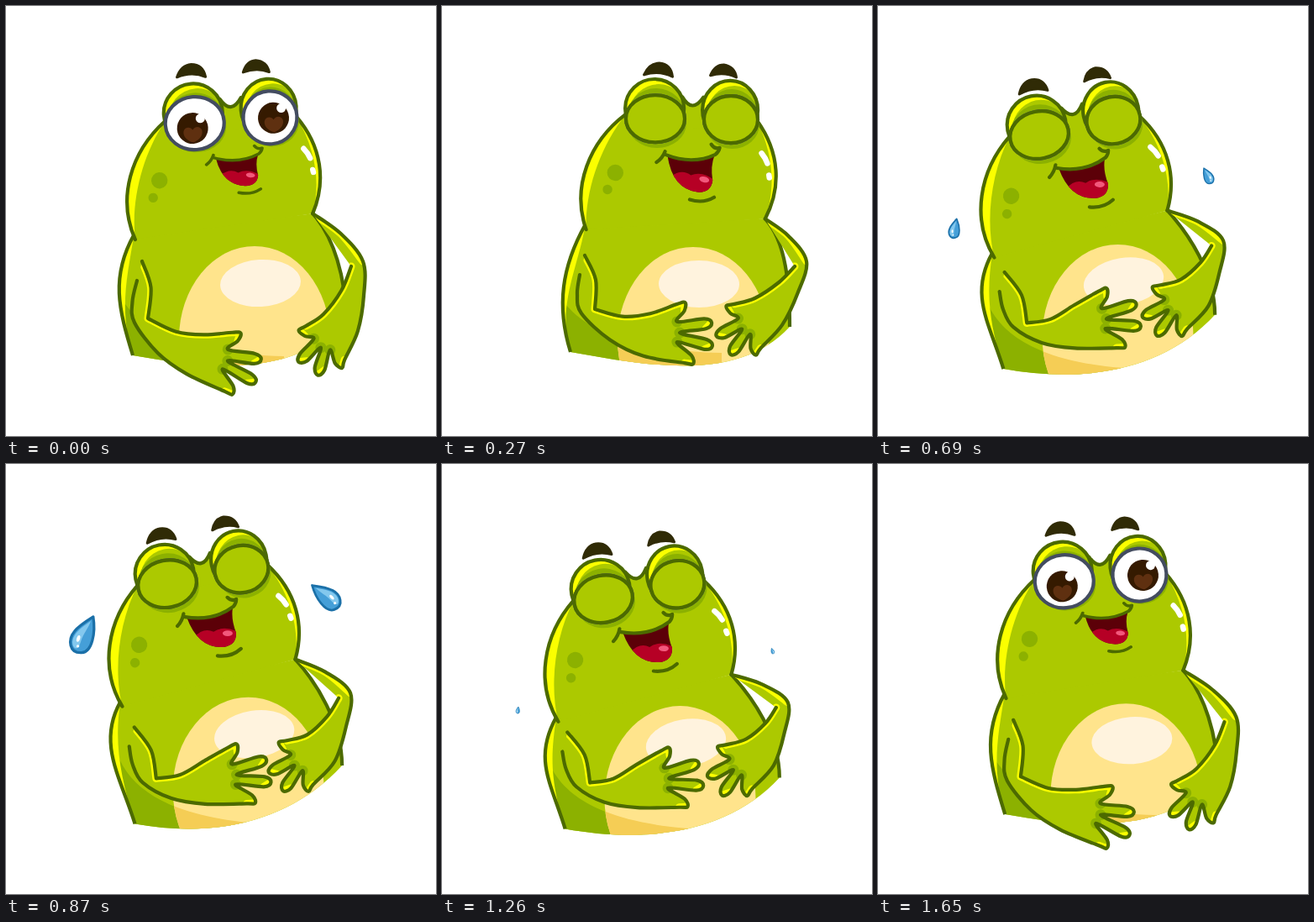
Recreate the animation shown at these times as an HTML page. Size 512 by 512 pixels, loop 1680 ms.

```html
<!DOCTYPE html>
<html lang="en">
<head>
<meta charset="utf-8">
<title>Laughing frog</title>
<style>
  html, body { margin: 0; width: 100%; height: 100%; overflow: hidden; background: #fff; }
  svg { display: block; width: 100%; height: 100%; }
  .line { fill: none; stroke: #4c6a00; stroke-width: 4.2; stroke-linecap: round; stroke-linejoin: round; }
  .butt { stroke-linecap: butt; }
  .skin { fill: #acc900; }
  .dark { fill: #8cb100; }
  .glow { fill: #fbff00; }
  .edge { fill: none; stroke: #fbff00; stroke-width: 9; stroke-linecap: round; stroke-linejoin: round; }
  .gap { fill: none; stroke: #8cb100; stroke-width: 13; stroke-linecap: round; }
</style>
</head>
<body>
<svg id="stage" viewBox="0 0 512 512" xmlns="http://www.w3.org/2000/svg"></svg>
<script>
const LOOP = 1680, STEP = 30, BEAT = 270;
const LOW = 485, SETTLE = 1320, TEARS = 465;
const RAD = Math.PI / 180;

// Joints as [x, y] or [x, y, angle]
const REST = {
  head: [269.5, 135, -4.3], base: [151, 416], hip: [405, 375], belly: [296, 396],
  shoulder: [162, 304], pit: [169, 372], palmL: [240, 415, 0],
  elbow: [425, 304], palmR: [385, 390, 27]
};
const LEAN = {
  head: [299, 133.5, 0.6], base: [153, 412], hip: [414, 382], belly: [299, 397],
  shoulder: [170, 297], pit: [182, 361], palmL: [258, 388, -15],
  elbow: [434, 304], palmR: [372, 372, 9]
};
const BENT = {
  head: [236, 152.5, -11.2], base: [146, 435], hip: [402, 375], belly: [283, 399],
  shoulder: [149, 320], pit: [176, 380], palmL: [245, 378, -25],
  elbow: [412, 285], palmR: [362, 352, 9]
};
const HIGH = {
  head: [236, 131.5, -11.2], base: [154, 428], hip: [400, 358], belly: [289, 387],
  shoulder: [153, 313], pit: [179, 374], palmL: [250, 373, -25],
  elbow: [410, 272], palmR: [358, 346, 9]
};
// Finger angle from the thumb, and length
const FINGERS = [[0, 47], [38, 64], [63, 66], [91, 56]];

const clamp = v => Math.max(0, Math.min(1, v));
const smooth = v => { const u = clamp(v); return u * u * (3 - 2 * u); };
const mix = (a, b, k) => {
  const out = {};
  for (const key in a) out[key] = a[key].map((v, i) => v + (b[key][i] - v) * k);
  return out;
};
const add = (p, x, y) => [p[0] + x, p[1] + y];
const mid = (p, q, x, y) => [(p[0] + q[0]) / 2 + x, (p[1] + q[1]) / 2 + y];

// Smooth line through points; a doubled point gives a corner.
function curve(p) {
  let d = 'M' + p[0];
  for (let i = 0; i < p.length - 1; i++) {
    const a = p[i - 1] || p[i], b = p[i], c = p[i + 1], e = p[i + 2] || c;
    if (b === c) continue;
    d += `C${b[0] + (c[0] - a[0]) / 6} ${b[1] + (c[1] - a[1]) / 6} ` +
         `${c[0] - (e[0] - b[0]) / 6} ${c[1] - (e[1] - b[1]) / 6} ${c}`;
  }
  return d;
}

// Hand outline from the top of the wrist, around the fingers, to the heel.
function hand([x, y, turn], flip, spread, size, heel) {
  const at = (deg, r, side = 0) => {
    const c = Math.cos((turn + deg) * RAD), s = Math.sin((turn + deg) * RAD);
    return [x + flip * (r * c - side * s), y + r * s + side * c];
  };
  const dirs = FINGERS.map(f => f[0] * spread - 33);
  const out = [at(-100, 24)];
  FINGERS.forEach(([, length], i) => {
    const r = length * size;
    if (i) out.push(at((dirs[i - 1] + dirs[i]) / 2, 25 * size));
    out.push(at(dirs[i], r - 8, -6), at(dirs[i], r), at(dirs[i], r - 8, 6));
  });
  out.push(at(heel, 34));
  return out;
}

const arm = id => `
  <clipPath id="${id}Clip"><use href="#${id}"/></clipPath>
  <path id="${id}" class="skin"/>
  <g clip-path="url(#${id}Clip)"><path id="${id}Gap" class="gap"/><path id="${id}Edge" class="edge"/></g>
  <path id="${id}Line" class="line"/>`;

const bump = (id, x, y, rx, ex, erx) => `
  <ellipse cx="${ex + 2}" cy="7" rx="${erx}" ry="29" class="dark"/>
  <clipPath id="${id}"><ellipse cx="${x}" cy="${y}" rx="${rx}" ry="35"/></clipPath>
  <g clip-path="url(#${id})">
    <rect x="${x - 40}" y="-50" width="80" height="90" class="glow"/>
    <ellipse cx="${x + 5}" cy="${y + 7}" rx="${rx}" ry="36" class="skin"/>
    <ellipse cx="${ex + 1}" cy="-1" rx="${erx}" ry="34" class="dark"/>
  </g>
  <ellipse cx="${x}" cy="${y}" rx="${rx}" ry="35" class="line"/>`;

const eye = (x, rx, ix, iy) => `
  <ellipse class="eye" cx="${x}" rx="${rx}" fill="#fff" stroke="#434c60" stroke-width="4.2"/>
  <g class="iris" transform="translate(${x + ix} ${iy})">
    <circle r="18.5" fill="#351a00"/>
    <path d="M0 17C-8 14-12 9-11 3-9-3-2-2 0 2 2-2 9-3 11 3 12 9 8 14 0 17Z" fill="#5f3010"/>
    <circle cx="10" cy="-11" r="5.5" fill="#fff"/>
  </g>`;

const lid = (x, rx) => `<ellipse class="eye skin" cx="${x}" rx="${rx}" stroke="#4c6a00" stroke-width="4.2"/>`;

const tear = id => `
  <g id="${id}">
    <path d="M15-22C17-4 12 20-1 20-16 20-17 4-8-6-3-12 6-17 15-22Z" fill="#459fd8" stroke="#1b70a8" stroke-width="3.2" stroke-linejoin="round"/>
    <path d="M12-17C8-8 2-2-1 6-3 12-6 16-9 14-14 8-10 0-5-5 0-10 6-13 12-17Z" fill="#83c8ee"/>
    <ellipse cx="-4" cy="3" rx="2" ry="4" transform="rotate(20 -4 3)" fill="#fff"/><circle cx="-5" cy="12" r="1.7" fill="#fff"/>
  </g>`;

const stage = document.getElementById('stage');
stage.innerHTML = `
  <clipPath id="bodyClip"><use href="#body"/></clipPath>
  <clipPath id="bellyClip"><use href="#belly"/></clipPath>
  <clipPath id="lidClip"><rect id="lidBox" x="-90" y="-36" width="180"/></clipPath>
  <clipPath id="mouthClip"><use href="#mouth"/></clipPath>
  <path id="body" class="skin"/>
  <g clip-path="url(#bodyClip)">
    <path id="shade" class="dark"/>
    <path id="sideGlow" class="glow"/>
    <ellipse id="belly" rx="90" ry="110" fill="#ffe48c"/>
    <g clip-path="url(#bellyClip)"><path id="bellyShade" fill="#f5cd55"/></g>
    <ellipse id="cream" rx="48" ry="28" fill="#fff3de"/>
  </g>
  <path id="sideLine" class="line butt"/>
  <path id="backLine" class="line butt"/>
  <g id="head">
    <path class="skin" d="M-80-4C-124 30-144 84-126 134L87 119C106 82 104 40 76 2L0-13Z"/>
    <path class="glow" d="M-80-4C-124 30-144 84-126 134-128 88-110 34-80-4ZM76 2C104 40 106 82 87 119 99 84 97 44 76 2Z"/>
    <path class="line" d="M-80-4C-124 30-144 84-126 134M76 2C104 40 106 82 87 119"/>
    <path class="skin" d="M-12-25Q-1-5 12-25L20 12H-20Z"/>
    ${bump('bumpL', -46, -11, 35, -45, 35)}
    ${bump('bumpR', 44, -10, 33, 45, 32)}
    <path class="line" d="M-13-25Q-1-5 12-25"/>
    ${eye(-45, 35, -3, 7)}${eye(45, 32, 4, 2)}
    <g clip-path="url(#lidClip)">${lid(-45, 35)}${lid(45, 32)}</g>
    <g id="brows" fill="#302b06" stroke="#302b06" stroke-width="3" stroke-linejoin="round">
      <path d="M-59-51Q-53-65-41-65-27-64-25-49-41-57-59-51Z"/>
      <path d="M20-51Q25-64 36-64 49-62 51-49 37-56 20-51Z"/>
    </g>
    <circle cx="-92" cy="66" r="9.7" class="dark"/><circle cx="-101" cy="86" r="5.7" class="dark"/>
    <g id="smile">
      <path id="mouth" d="M-30 45Q-2 54 26 44 21 57 24 74 22 89 6 88-24 84-30 45Z" fill="#5c0008"/>
      <g clip-path="url(#mouthClip)">
        <path d="M-26 70Q-13 60-2 68 12 62 28 75L22 95-20 95Z" fill="#b60025"/>
        <ellipse cx="14" cy="73" rx="6" ry="3.4" transform="rotate(12 14 73)" fill="#f2587c"/>
      </g>
      <path class="line" d="M-43 53Q-36 48-33 40M-32 44Q0 56 27 43 31 40 32 35 26 37 22 31M-3 97Q13 102 26 94"/>
    </g>
    <path d="M82 41Q87 47 89 53M91 67L91.5 70" fill="none" stroke="#fff" stroke-width="6.5" stroke-linecap="round"/>
  </g>
  ${arm('right')}${arm('left')}${tear('tearL')}${tear('tearR')}`;

const $ = id => document.getElementById(id);
const draw = (id, d) => $(id).setAttribute('d', d);
const move = (id, value) => $(id).setAttribute('transform', value);

function poseAt(t) {
  const u = clamp(t / BEAT), s = clamp((t - SETTLE) / (LOOP - SETTLE));
  const start = u + u * u - u * u * u, end = s * s * (2 - s);
  const bob = t < 1430 ? 0.545 * (1 + Math.cos(2 * Math.PI * (t - LOW) / BEAT)) : 0;
  const swing = 19 * Math.sin(Math.PI * (u < 1 ? u : clamp((t - 1440) / 240))) ** 2;

  let pose;
  if (u < 1) pose = mix(REST, LEAN, start);
  else if (t < LOW) pose = mix(LEAN, mix(HIGH, BENT, 1.09), smooth((t - BEAT) / (LOW - BEAT)));
  else pose = mix(mix(HIGH, BENT, bob), REST, end);

  pose.head[1] -= 6 * Math.sin(Math.PI * u);
  pose.elbow[0] += swing;
  pose.palmR[0] += swing;
  pose.calm = u < 1 ? 1 - start : end;
  pose.open = 1 - clamp((t - 60) / 90) * (1 - clamp((t - 1500) / 90));
  return pose;
}

function drawBody(p, neckL, neckR) {
  const { base, hip } = p;
  const rise = [add(base, -17, -55), add(neckL, -28, 50)];
  const side = `M${base}C${rise} ${neckL}`;
  const back = `C${add(neckR, 25, 27)} ${add(hip, 0, -50)} ${hip}`;
  draw('body', `${side}L${neckR}${back}C${add(hip, -60, 65)} ${add(base, 100, 18)} ${base}Z`);
  draw('sideLine', side);
  draw('backLine', `M${neckR}${back}`);
  draw('sideGlow', `${side}C${add(rise[1], 20, 0)} ${add(rise[0], 0, 0)} ${base}Z`);
  const shade = `M${add(base, -24, -92)}c15 55 75 90 204 93v60h-220z`;
  draw('shade', shade);
  draw('bellyShade', shade);
  move('belly', `translate(${p.belly})`);
  move('cream', `translate(${add(p.belly, 7, -66)}) rotate(${p.head[2] * 0.8})`);
}

function drawArm(id, before, fingers, after, edges) {
  const all = [...before, ...fingers, ...after], d = curve(all);
  const tips = FINGERS.map((_, i) => curve(fingers.slice(2 + 4 * i, 4 + 4 * i)));
  draw(id, d);
  draw(id + 'Line', d);
  draw(id + 'Edge', [...edges(all).map(curve), ...tips].join(''));
  draw(id + 'Gap', [4, 8, 12].map(i => `M${fingers[i]}h.01`).join(''));
}

function drawArms(p, neckR) {
  const { shoulder, pit, elbow } = p;
  const left = hand(p.palmL, 1, 1, 1, 137);
  const bend = add(pit, -16, 5), outer = add(shoulder, -6, 23);
  drawArm('left',
    [shoulder, mid(shoulder, pit, 7, -3), pit, pit, mid(pit, left[0], 0, 6)], left,
    [mid(left.at(-1), bend, -3, 6), bend, mid(bend, outer, -4, 0), outer],
    a => [a.slice(0, 3), a.slice(3, 8)]);

  const right = hand(p.palmR, -1, 1.28, 0.78, 158), crook = add(elbow, -14, 6);
  drawArm('right',
    [crook, mid(crook, right[0], 5, 0)], right,
    [mid(right.at(-1), elbow, 4, 0), elbow, mid(elbow, neckR, 3, -5), neckR],
    a => [a.slice(0, 4), a.slice(-3)]);
}

// A tear grows as it is thrown sideways, then falls and shrinks.
function drawTear(id, t, flip, x, y, reach, time, fall, turn, spin, size) {
  const age = (t - TEARS) % BEAT, live = t > TEARS && t < 1530;
  $(id).style.display = live ? '' : 'none';
  if (!live) return;
  const scale = size * Math.sin(Math.PI * age / BEAT);
  move(id, `translate(${x - flip * reach * smooth(age / time)} ${y + fall * age * age}) ` +
           `rotate(${flip * (turn - spin * age)}) scale(${flip * scale} ${scale})`);
}

function render(t) {
  const p = poseAt(t), [hx, hy, tilt] = p.head;
  const c = Math.cos(tilt * RAD), s = Math.sin(tilt * RAD);
  const onHead = (x, y) => [hx + x * c - y * s, hy + x * s + y * c];
  const neckR = onHead(87, 119);

  drawBody(p, onHead(-127, 128), neckR);
  move('head', `translate(${hx} ${hy}) rotate(${tilt})`);
  stage.querySelectorAll('.eye').forEach(e => {
    e.setAttribute('ry', 28 + 3.5 * p.open);
    e.setAttribute('cy', 1.2);
  });
  stage.querySelectorAll('.iris').forEach(e => { e.style.display = p.open > 0 ? '' : 'none'; });
  $('lidBox').setAttribute('height', (1 - p.open) * 74);
  move('brows', `translate(${-3 * p.open} ${-4 * p.open})`);
  move('smile', `translate(${4 * p.calm} ${8 * p.calm}) scale(${1 - 0.1 * p.calm} ${1 - 0.18 * p.calm})`);

  drawArms(p, neckR);
  drawTear('tearL', t, 1, 128, 170, 38, 120, 0.0019, 20, 0.17, 1);
  drawTear('tearR', t, -1, 328, 132, 66, 180, 0.0014, 58, 0.27, 0.87);
}

const begin = performance.now();
function tick() {
  const t = Math.max(0, performance.now() - begin) % LOOP;
  render(Math.floor(t / STEP) * STEP);
  requestAnimationFrame(tick);
}
tick();
</script>
</body>
</html>
```
